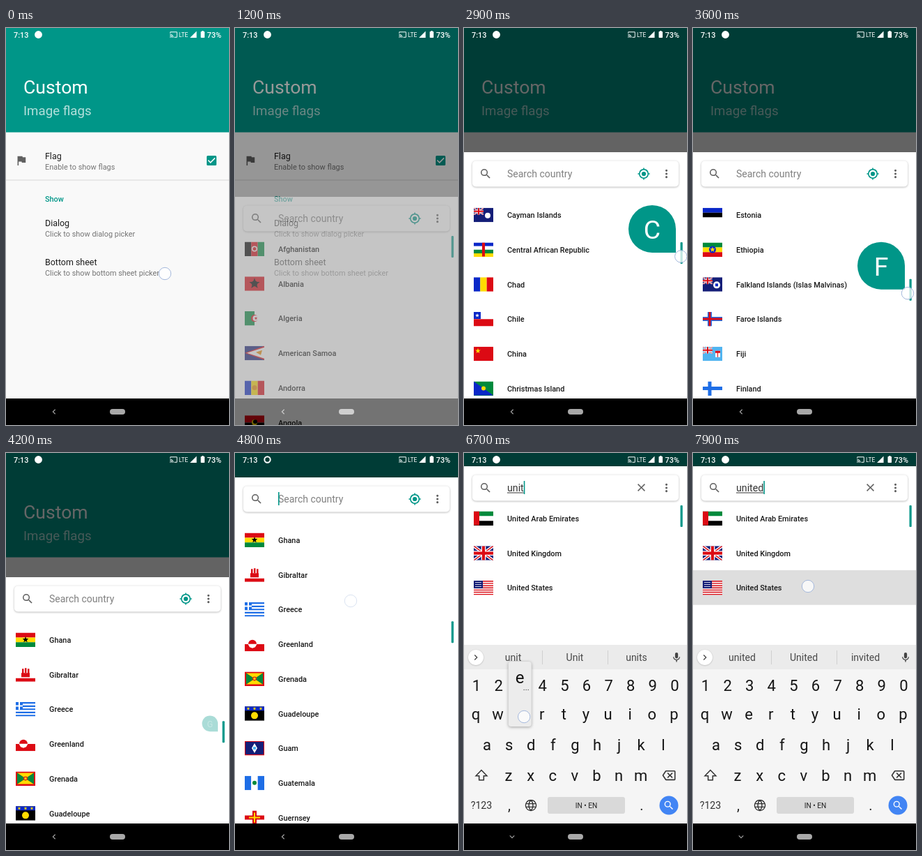
Write an HTML page with a canvas that moves like this. It is 320 px wide and 569 px high and loops after 8000 ms.

```html
<!DOCTYPE html>
<html lang="en">
<head>
<meta charset="utf-8">
<title>Country picker</title>
<style>
html, body { margin: 0; width: 100%; height: 100%; overflow: hidden; background: #000; }
canvas { display: block; width: 320px; height: 569px; }
</style>
</head>
<body>
<canvas id="stage"></canvas>
<script>
const W = 320, H = 569, LOOP = 8000, STEP = 100;
const NAV = 531, PITCH = 49.75, KEYS_TOP = 275;
const TEAL = '#009688', GREY = '#616161';

// name:flag, where a flag is a list of drawing ops on a 28 x 20 grid
const COUNTRIES = `Afghanistan:vKRG cW14,10,4 cR14,10,2.5
Albania:hR sK14,10,8 cK14,10,4
Algeria:vGW cR14,10,5 cW15.5,10,4 sR16,10,2.5
American Samoa:hN pR0,10,28,0,28,20 pW3,10,28,2,28,18 pO16,9,25,6,23,13
Andorra:vBYR cO14,10,3.5
Angola:hRK cY14,10,4 cK15,9,3
Anguilla:hN J rW18,6,6,8 cO21,10,2
Antarctica:hA pW8,6,12,7,15,4,21,6,22,11,18,15,13,14,11,10
Antigua & Barbuda:hR pK0,0,28,0,14,20 cY14,8,4 pB5.6,8,22.4,8,18.9,13,9.1,13 pW9.1,13,18.9,13,14,20
Argentina:hLWL cY14,10,2.5
Armenia:hRBO
Aruba:hL rY0,13,28,1.6 rY0,16,28,1.6 sR5,5,3.5
Australia:hN J sW7,15,3 sW21,4,2 sW25,8,2 sW17,9,2 sW21,16,2
Austria:hRWR
Azerbaijan:hLRG cW14,10,2.5
Bahamas:hLYL pK0,0,12,10,0,20
Bahrain:vWRR
Bangladesh:hG cR13,10,6
Barbados:vBYB sK14,10,4
Belarus:hRRG
Belgium:vKYR
Belize:hB cW14,10,6 cG14,10,3
Benin:hYR rG0,0,11,20
Bermuda:hR J rW18,6,6,8
Bhutan:hO pY0,0,28,0,0,20 cW14,10,4
Bolivia:hRYG
Bosnia And Herzegovina:hN pY8,0,22,0,22,20
Botswana:hLKL
Brazil:hG pY14,2,26,10,14,18,2,10 cB14,10,4
British Indian Ocean Territory:hWBWBWB J
British Virgin Islands:hN J cG20,11,4
Brunei:hY pW0,2,28,12,28,17,0,7 cR14,10,4
Bulgaria:hWGR
Burkina Faso:hRG sY14,10,4
Burundi:hRG pG0,0,14,10,0,20 pG28,0,14,10,28,20 cW14,10,5 sR14,10,3
Cambodia:hBRRB rW10,7,8,6
Cameroon:vGRY sY14,10,3
Canada:vRWWR sR14,10,5
Cape Verde:hBBWRB
Cayman Islands:hN J cW20,11,4
Central African Republic:hBWGY rR12,0,4,20
Chad:vBYR
Chile:hWR rB0,0,10,10 sW5,5,3
China:hR sY6,6,4
Christmas Island:hG pB0,0,28,20,0,20 cY14,10,3
Cocos (Keeling) Islands:hG cY14,10,4
Colombia:hYYBR
Comoros:hYWRB pG0,0,13,10,0,20
Congo:hG pR28,0,28,20,0,20 pY0,20,20,0,28,0,8,20
Congo, Democratic Republic:hL pY0,20,28,0,28,4,5,20 sY5,5,4
Cook Islands:hN J cW20,10,4 cN20,10,3
Costa Rica:hBWRRWB
Cote d'Ivoire:vOWG
Croatia:hRWB rR11,5,6,8
Cuba:hBWBWB pR0,0,13,10,0,20
Curacao:hB rY0,13,28,3 sW6,5,3
Cyprus:hW pO7,9,21,5,17,12,10,12
Czech Republic:hWR pB0,0,13,10,0,20
Denmark:hR xW4
Djibouti:hLG pW0,0,14,10,0,20 sR5,10,3
Dominica:hG rY0,8,28,4 rK12,0,4,20 cR14,10,5
Dominican Republic:hBR rR0,0,14,10 rB0,10,14,10 rW12,0,4,20 rW0,8,28,4
Ecuador:hYYBR cO14,9,3
Egypt:hRWK cY14,10,2
El Salvador:hBWB cG14,10,2
Equatorial Guinea:hGWR pB0,0,7,10,0,20
Eritrea:hGB pR0,0,28,10,0,20 cY8,10,3
Estonia:hBKW
Ethiopia:hGYR cB14,10,5 sY14,10,4
Falkland Islands (Islas Malvinas):hN J cW20,11,5 rB18,9,4,4
Faroe Islands:hW xA6 xR3
Fiji:hL J rW18,6,7,9 rR18,6,7,3 rR21,6,1,9
Finland:hW xA5
France:vBWR
French Guiana:hG pY0,0,0,20,28,20 sR14,10,4
French Polynesia:hRWWR cB14,10,4
Gabon:hGYB
Gambia:hRBG rW0,6,28,1 rW0,13,28,1
Georgia:hW rR12,0,4,20 rR0,8,28,4
Germany:hKRY
Ghana:hRYG sK14,10,4.5
Gibraltar:hWWWR rR8,8,12,6 rR9,2,2.5,7 rR13,1,2.5,7 rR17,2,2.5,7
Greece:hAWAWAWAWA rA0,0,10,11 rW4,0,2,11 rW0,4.5,10,2
Greenland:hWR cR11,10,6 pW4.5,10,17.5,10,15,14.5,11,16,7,14.5
Grenada:hR pY2,2,26,2,14,10 pY2,18,26,18,14,10 pG2,2,2,18,14,10 pG26,2,26,18,14,10 cR14,10,3 sY14,10,3
Guadeloupe:hK rB0,0,28,6 sY5,3,2.5 sY14,3,2.5 sY23,3,2.5 cY14,13,5
Guam:hR rN1,1,26,18 pW14,3,18,10,14,17,10,10 rL12,8,4,4
Guatemala:vAWA cG14,10,3
Guernsey:hW rR11,0,6,20 rR0,7,28,6 rY13,3,2,14 rY6,9,16,2
Hungary:hRWG
Reunion:vBWR
Tunisia:hR cW14,10,6 cR14,10,4 sW15,10,2
United Arab Emirates:hGWK rR0,0,8,20
United Kingdom:hN U
United States:hRWRWRWRWRWRWR rN0,0,13,10.8 rE2,2,9,1 rE2,5,9,1 rE2,8,9,1`
  .split('\n').map(s => s.split(':'));

const INK = { R: '#dc0a14', W: '#fff', B: '#0a28c8', K: '#000', Y: '#ffdc00', G: '#008a3c',
  L: '#50b4f0', O: '#f08c00', N: '#141e78', A: '#1e6ee6', E: '#c8c8dc' };

const ICON = {
  flag: 'M14.4 6L14 4H5v17h2v-7h5.6l.4 2h7V6z',
  search: 'M15.5 14h-.79l-.28-.27A6.47 6.47 0 0 0 16 9.5 6.5 6.5 0 1 0 9.5 16c1.61 0 3.09-.59 4.23-1.57l.27.28v.79l5 4.99L20.49 19zm-6 0a4.5 4.5 0 1 1 0-9 4.5 4.5 0 0 1 0 9z',
  locate: 'M12 8a4 4 0 1 0 0 8 4 4 0 0 0 0-8zm8.94 3A9 9 0 0 0 13 3.06V1h-2v2.06A9 9 0 0 0 3.06 11H1v2h2.06A9 9 0 0 0 11 20.94V23h2v-2.06A9 9 0 0 0 20.94 13H23v-2zM12 19a7 7 0 1 1 0-14 7 7 0 0 1 0 14z',
  more: 'M12 4a2 2 0 1 0 .01 0zM12 10a2 2 0 1 0 .01 0zM12 16a2 2 0 1 0 .01 0z',
  close: 'M19 6.41L17.59 5 12 10.59 6.41 5 5 6.41 10.59 12 5 17.59 6.41 19 12 13.41 17.59 19 19 17.59 13.41 12z',
  check: 'M19 3H5a2 2 0 0 0-2 2v14a2 2 0 0 0 2 2h14a2 2 0 0 0 2-2V5a2 2 0 0 0-2-2zm-9 14l-5-5 1.41-1.41L10 14.17l7.59-7.59L19 8z',
  mic: 'M12 14a3 3 0 0 0 3-3V5a3 3 0 0 0-6 0v6a3 3 0 0 0 3 3zm5.3-3c0 3-2.54 5.1-5.3 5.1S6.7 14 6.7 11H5c0 3.41 2.72 6.23 6 6.72V21h2v-3.28c3.28-.48 6-3.3 6-6.72z',
  erase: 'M22 3H7c-.7 0-1.2.35-1.6.9L0 12l5.4 8.1c.4.55.9.9 1.6.9h15a2 2 0 0 0 2-2V5a2 2 0 0 0-2-2zm0 16H7.07L2.4 12l4.66-7H22zm-11.59-2L14 13.41 17.59 17 19 15.59 15.41 12 19 8.41 17.59 7 14 10.59 10.41 7 9 8.41 12.59 12 9 15.59z',
  cast: 'M21 3H3a2 2 0 0 0-2 2v3h2V5h18v14h-7v2h7a2 2 0 0 0 2-2V5a2 2 0 0 0-2-2zM1 18v3h3a3 3 0 0 0-3-3zm0-4v2a5 5 0 0 1 5 5h2a7 7 0 0 0-7-7zm0-4v2a9 9 0 0 1 9 9h2A11 11 0 0 0 1 10z',
  shift: 'M12 3L2.5 13H8v7h8v-7h5.5z',
  globe: 'M12 2.5a9.5 9.5 0 1 0 .01 0zM3.5 9h17M3.5 15h17M12 2.5c-5 5-5 14 0 19c5-5 5-14 0-19z',
  right: 'M9 6l6 6-6 6',
  left: 'M15 6l-6 6 6 6',
  down: 'M6 9l6 6 6-6'
};

const ROWS = [['1234567890', 18, 333], ['qwertyuiop', 17, 374], ['asdfghjkl', 33, 418], ['zxcvbnm', 64, 462]];
const KEY = {};
for (const [chars, x, y] of ROWS)
  [...chars].forEach((c, i) => KEY[c] = { x: x + i * 31.6, y });

const TYPED = [['u', 5400], ['n', 5600], ['i', 6000], ['t', 6400], ['e', 6700], ['d', 7000]];
const HINTS = { '': 'I,The,I\'m', u: 'u,you,I', un: 'un,in,I\'m', uni: 'uni,in,university',
  unit: 'unit,Unit,units', unite: 'unite,united,invite', united: 'united,United,invited' };

const TAPS = [[0, 200, 228, 352], [4600, 4900, 166, 212], [7600, LOOP + STEP, 165, 191],
  ...TYPED.map(([c, t]) => [t, t + 200, KEY[c].x + 6, KEY[c].y + 4])];

const makeLayer = canvas => {
  const k = devicePixelRatio || 1;
  canvas.width = W * k;
  canvas.height = H * k;
  const ctx = canvas.getContext('2d');
  ctx.scale(k, k);
  return ctx;
};
const main = makeLayer(document.getElementById('stage'));
const layer = makeLayer(document.createElement('canvas'));
let g = main;

// piecewise linear value at time t
function ramp(t, ...pts) {
  if (t <= pts[0][0]) return pts[0][1];
  for (let i = 1; i < pts.length; i++) {
    const [a, u] = pts[i - 1], [b, v] = pts[i];
    if (t <= b) return u + (v - u) * (t - a) / (b - a);
  }
  return pts.at(-1)[1];
}

function rect(x, y, w, h, color, r = 0) {
  g.fillStyle = color;
  g.beginPath();
  g.roundRect(x, y, w, h, r);
  g.fill();
}

function disc(x, y, r, color) {
  g.fillStyle = color;
  g.beginPath();
  g.arc(x, y, r, 0, 7);
  g.fill();
}

function poly(color, n) {
  g.fillStyle = color;
  g.beginPath();
  for (let i = 0; i < n.length; i += 2) g.lineTo(n[i], n[i + 1]);
  g.fill();
}

function text(s, x, y, size, color, weight = 400, align = 'left') {
  g.font = `${weight} ${size}px Roboto, "Open Sans", sans-serif`;
  g.textAlign = align;
  g.fillStyle = color;
  g.fillText(s, x, y);
}

function icon(name, x, y, size, color, stroke) {
  g.save();
  g.translate(x - size / 2, y - size / 2);
  g.scale(size / 24, size / 24);
  const p = new Path2D(ICON[name]);
  if (stroke) {
    g.lineWidth = stroke;
    g.strokeStyle = color;
    g.stroke(p);
  } else {
    g.fillStyle = color;
    g.fill(p, 'evenodd');
  }
  g.restore();
}

function shadow(color, blur, dy) {
  g.shadowColor = color;
  g.shadowBlur = blur;
  g.shadowOffsetY = dy;
}

function ripple(x, y, top, h, r, alpha) {
  if (!alpha) return;
  g.save();
  g.beginPath();
  g.rect(0, top, W, h);
  g.clip();
  disc(x, y, r, `rgba(0,0,0,${alpha})`);
  g.restore();
}

function union(w, h) {
  const line = (color, width, ...n) => {
    g.strokeStyle = color;
    g.lineWidth = width * h / 20;
    g.beginPath();
    for (let i = 0; i < n.length; i += 4) {
      g.moveTo(n[i] * w, n[i + 1] * h);
      g.lineTo(n[i + 2] * w, n[i + 3] * h);
    }
    g.stroke();
  };
  const diagonal = [0, 0, 1, 1, 0, 1, 1, 0], cross = [.5, 0, .5, 1, 0, .5, 1, .5];
  g.save();
  g.beginPath();
  g.rect(0, 0, w, h);
  g.clip();
  line(INK.W, 4, ...diagonal);
  line(INK.R, 1.5, ...diagonal);
  line(INK.W, 6.5, ...cross);
  line(INK.R, 4, ...cross);
  g.restore();
}

function flag(spec, x, y) {
  g.save();
  g.translate(x, y);
  g.beginPath();
  g.rect(0, 0, 28, 20.5);
  g.clip();
  for (const op of spec.split(' ')) {
    const kind = op[0], color = INK[op[1]], n = op.slice(2).split(',').map(Number);
    const bands = [...op.slice(1)];
    if (kind === 'h') bands.forEach((c, i) => rect(0, i * 20.5 / bands.length, 28, 20.5 / bands.length, INK[c]));
    if (kind === 'v') bands.forEach((c, i) => rect(i * 28 / bands.length, 0, 28 / bands.length, 20.5, INK[c]));
    if (kind === 'r') rect(...n, color);
    if (kind === 'c') disc(...n, color);
    if (kind === 'p') poly(color, n);
    if (kind === 's') {
      const pts = [];
      for (let i = 0; i < 10; i++) {
        const r = i % 2 ? n[2] * .42 : n[2], a = i * Math.PI / 5;
        pts.push(n[0] + r * Math.sin(a), n[1] - r * Math.cos(a));
      }
      poly(color, pts);
    }
    if (kind === 'x') {
      rect(10 - n[0] / 2, 0, n[0], 20.5, color);
      rect(0, 10 - n[0] / 2, 28, n[0], color);
    }
    if (kind === 'J') union(14, 10);
    if (kind === 'U') union(28, 20.5);
  }
  g.restore();
}

function page(t) {
  rect(0, 0, W, H, '#f9f9f9');
  rect(0, 0, W, 149.5, TEAL);
  text('Custom', 25, 94, 26.6, '#fff');
  text('Image flags', 25, 124.5, 18.7, 'rgba(255,255,255,.7)');
  icon('flag', 22, 190, 18.7, GREY);
  icon('check', 295, 190, 18.7, TEAL);
  rect(0, 217.5, W, 1, '#d8d8d8');
  ripple(228, 352, 315, 56, ramp(t, [0, 20], [300, 280]),
    ramp(t, [0, 0], [100, .07], [200, .1], [300, .05], [400, 0]));
  text('Show', 56, 248.5, 10.9, TEAL, 500);
  const items = [['Flag', 'Enable to show flags', 188], ['Dialog', 'Click to show dialog picker', 284],
    ['Bottom sheet', 'Click to show bottom sheet picker', 340]];
  for (const [title, note, y] of items) {
    text(title, 56, y, 12.45, '#1c1c1c');
    text(note, 56, y + 15, 10.9, '#757575');
  }
}

function navBar(keyboard) {
  rect(0, NAV, W, H - NAV, '#000');
  icon(keyboard ? 'down' : 'left', 69, 550, 13, '#a0a0a0', 2.2);
  rect(149, 546, 22, 8, '#a8a8a8', 4);
}

function statusBar(t) {
  text('7:13', 11, 13.5, 10.9, '#fff', 500);
  const ring = (t >= 2000 && t < 2400) || (t >= 4700 && t < 5200);
  if (ring) {
    g.strokeStyle = '#fff';
    g.lineWidth = 2;
    g.beginPath();
    g.arc(46.5, 9.5, 4.2, 0, 7);
    g.stroke();
  } else disc(46.5, 9.5, 5.4, '#fff');
  icon('cast', 240.5, 9.5, 11.5, '#fff');
  text('LTE', 248, 13, 8.4, '#fff');
  poly('#fff', [264, 14, 273.5, 14, 273.5, 4.5]);
  rect(279.5, 5, 5.5, 9, '#fff', .8);
  rect(281, 4, 2.5, 2, '#fff');
  text('73%', 288.5, 13.5, 10.9, '#fff', 500);
}

function list(t, top, scroll, query) {
  const rows = query ? COUNTRIES.filter(c => c[0].toLowerCase().includes(query)) : COUNTRIES;
  g.save();
  g.beginPath();
  g.rect(0, top + 55, W, H);
  g.clip();
  ripple(165, 191, 168, PITCH, ramp(t, [7500, 20], [7600, 60], [7900, 330]),
    ramp(t, [7500, 0], [7600, .05], [7900, .13]));
  rows.forEach(([name, spec], i) => {
    const y = top + 74.8 + i * PITCH - scroll;
    if (y < top || y > H + 20) return;
    flag(spec, 14, y - 10.2);
    text(name, 62, y + 4, 10.9, '#1a1a1a', 500);
  });
  g.restore();
}

function searchCard(t, top, query) {
  const y = top + 31;
  g.save();
  shadow('rgba(0,0,0,.3)', 3, .7);
  rect(12, top + 12.5, 296, 37, '#fff', 5);
  g.restore();
  icon('search', 31, y, 18.7, GREY);
  icon('more', 290.5, y, 18.7, GREY);
  if (query) {
    icon('close', 254.5, y - .5, 18.7, GREY);
    text(query, 62, y + 5, 14.2, '#333');
  } else {
    icon('locate', 258, y, 18.7, TEAL);
    text('Search country', 62, y + 5, 14, '#808080');
  }
  const end = query ? g.measureText(query).width : 0;
  if (query) rect(62, y + 6.5, end, 1, '#333');
  if (t >= 4700) rect(62 + end, y - 10, 1.6, 19, TEAL);
}

function bubble(t, y, letter) {
  if (t < 1900 || t >= 4300) return;
  const k = ramp(t, [4000, 1], [4300, 0]);
  g.save();
  g.globalAlpha = k;
  g.translate(304, y + 68);
  g.scale(k, k);
  rect(-68, -68, 68, 68, TEAL, [34, 34, 0, 34]);
  text(letter, -34, -20, 37.4, '#fff', 400, 'center');
  g.restore();
}

function keyboard(t, query) {
  rect(0, KEYS_TOP, W, NAV - KEYS_TOP, '#f5f5f5');
  rect(0, KEYS_TOP, W, 35, '#ebebeb');
  g.save();
  shadow('rgba(0,0,0,.25)', 2, .5);
  disc(17, 293, 11, '#fff');
  g.restore();
  icon('right', 17, 293, 14, '#444', 2.2);
  HINTS[query].split(',').forEach((s, i) => text(s, 70.5 + i * 88.5, 298, 14, '#484848', 400, 'center'));
  rect(112, 283, 1, 20, '#cfcfcf');
  rect(206, 283, 1, 20, '#cfcfcf');
  icon('mic', 305, 293, 17, '#444');
  for (const c in KEY) text(c, KEY[c].x, KEY[c].y + 7.5, 22, '#151515', 400, 'center');
  icon('shift', 25, 462, 20, '#333', 1.8);
  icon('erase', 294, 462, 19, '#333');
  text('?123', 25, 510, 14.2, '#333', 400, 'center');
  text(',', 65, 512, 20, '#222', 400, 'center');
  icon('globe', 96, 505, 19, '#333', 1.7);
  rect(120, 493, 111, 24, '#d9d9d9', 3);
  text('IN • EN', 175.5, 508.5, 10.2, '#222', 400, 'center');
  text('.', 255, 512, 20, '#222', 400, 'center');
  disc(294, 505, 13.5, '#4285f4');
  icon('search', 294, 505, 17, '#fff');
  for (const [c, start] of TYPED) {
    if (t < start || t >= start + 200) continue;
    const { x, y } = KEY[c];
    g.save();
    shadow('rgba(0,0,0,.35)', 4, 1);
    rect(x - 16.5, y - 75, 33, 93, '#ececec', 4);
    g.restore();
    text(c, x, y - 44, 24, '#111', 400, 'center');
    text('...', x + 9, y - 34, 11, '#222', 400, 'center');
  }
}

function sheet(t) {
  const top = ramp(t, [1000, 480], [1100, 350], [1200, 242], [1300, 178], [4600, 178],
    [4700, 105], [4800, 35], [4900, 22], [5000, 19]);
  const typed = delay => TYPED.filter(k => t >= k[1] + delay).map(k => k[0]).join('');
  const query = typed(100), filter = typed(200);
  const scroll = filter ? 0 : ramp(t, [1930, 0], [2100, 333], [3600, 3318], [3900, 3965]);
  const thumb = top + 56 + scroll / 26.4;
  rect(0, top, W, H, '#fff');
  list(t, top, scroll, filter);
  searchCard(t, top, query);
  rect(310.5, thumb, 3.2, 31, TEAL, 1);
  bubble(t, Math.max(top + 55, thumb - 53), COUNTRIES[Math.round(scroll / PITCH) + 6][0][0]);
  if (t >= 5200) keyboard(t, query);
  return thumb;
}

function touch(x, y, alpha) {
  g.save();
  g.globalAlpha = alpha;
  disc(x, y, 8.7, 'rgba(255,255,255,.75)');
  g.strokeStyle = '#a4b8dc';
  g.lineWidth = 1;
  g.stroke();
  g.restore();
}

function draw(t) {
  g = main;
  page(t);
  rect(0, 0, W, H, `rgba(0,0,0,${ramp(t, [900, 0], [1000, .12], [1100, .27], [1200, .4], [1300, .6])})`);
  navBar(false);
  let thumb = 0;
  if (t >= 1000) {
    g = layer;
    g.clearRect(0, 0, W, H);
    thumb = sheet(t);
    g = main;
    g.globalAlpha = ramp(t, [900, 0], [1000, .1], [1100, .25], [1200, .45], [1300, 1]);
    g.drawImage(layer.canvas, 0, 0, W, H);
    g.globalAlpha = 1;
    if (t >= 1300) navBar(t >= 5200);
  }
  statusBar(t);
  if (t >= 1900 && t < 4000) touch(ramp(t, [1900, 316], [2100, 315], [3900, 306.6]), thumb + 20.5, 1);
  for (const [from, to, x, y] of TAPS)
    if (t >= from && t < to) touch(x, y, from && to - t <= STEP && y < 300 ? .4 : 1);
}

let shown = -1;
function frame(now) {
  const t = Math.floor(now % LOOP / STEP) * STEP;
  if (t !== shown) draw(shown = t);
  requestAnimationFrame(frame);
}
draw(0);
requestAnimationFrame(frame);
</script>
</body>
</html>
```
